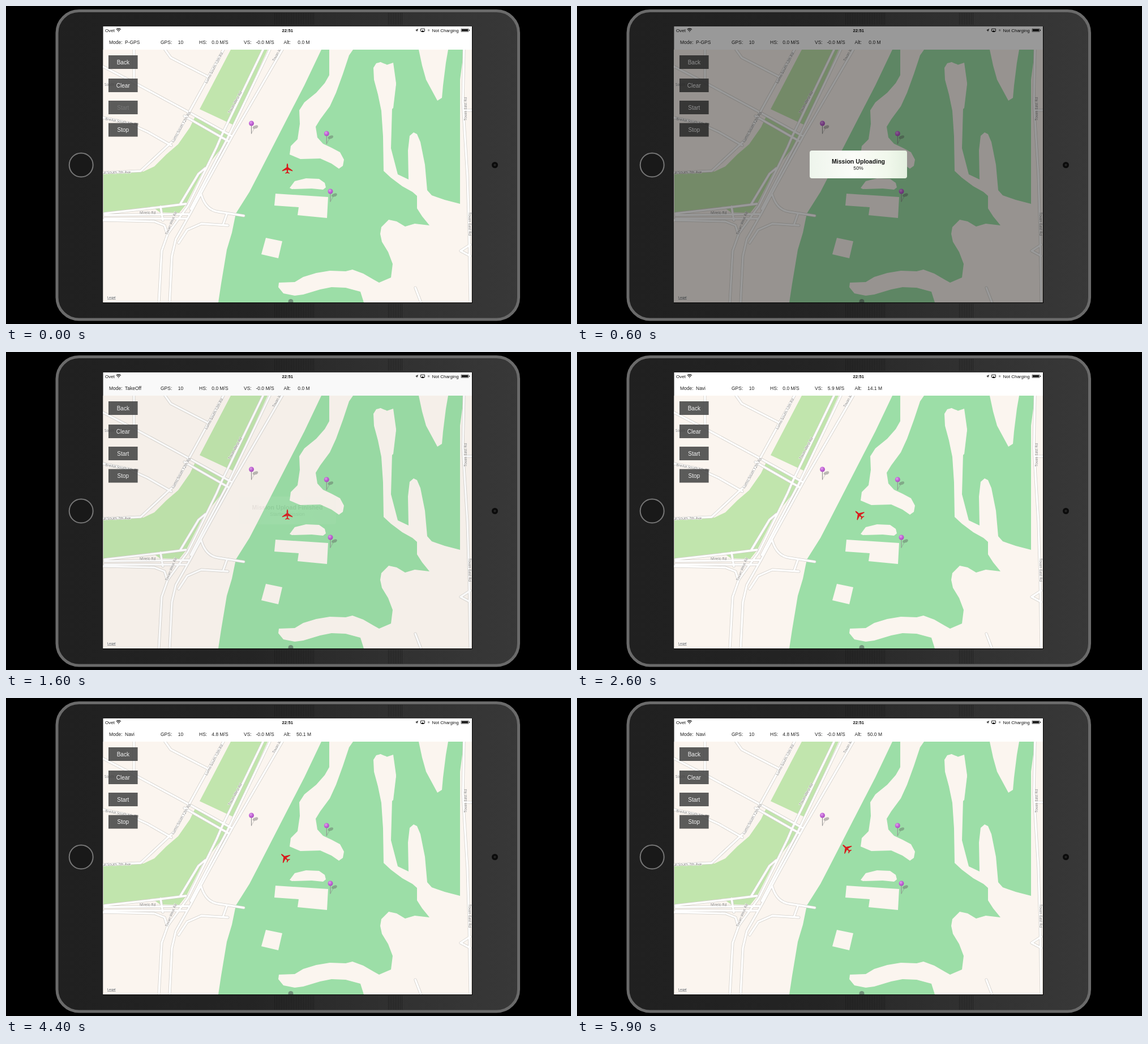
An HTML page that plays this animation: 998x561 px, repeating every 6000 ms.

```html
<!DOCTYPE html>
<html lang="en">
<head>
<meta charset="utf-8">
<title>Flight mission</title>
<style>
html, body { margin: 0; width: 100%; height: 100%; overflow: hidden; background: #000; }
svg { display: block; width: 100vw; height: 100vh; }
text { font-family: "Liberation Sans", Arial, sans-serif; }
.case, .road { fill: none; stroke-linejoin: round; stroke-linecap: round; }
.case { stroke: #d3d0cb; stroke-width: 5; }
.road { stroke: #fff; stroke-width: 3.4; }
.label { font: 6.4px "Open Sans", sans-serif; fill: #77736f; stroke: #fff; stroke-width: 1; paint-order: stroke; }
.bar { font-size: 8.5px; fill: #222; }
.status { font-size: 8px; fill: #111; }
.button { font-size: 10px; fill: #f2f2f2; }
.mid { text-anchor: middle; }
</style>
</head>
<body>
<svg viewBox="0 0 998 561" preserveAspectRatio="none">
  <defs>
    <linearGradient id="bezel">
      <stop offset="0" stop-color="#202020"/><stop offset=".42" stop-color="#242424"/>
      <stop offset=".56" stop-color="#2b2b2b"/><stop offset=".74" stop-color="#313131"/>
      <stop offset="1" stop-color="#383838"/>
    </linearGradient>
    <linearGradient id="panel">
      <stop offset="0" stop-color="#eef5ec"/><stop offset=".45" stop-color="#fbfcf8"/>
      <stop offset=".8" stop-color="#f1f8ec"/><stop offset="1" stop-color="#e3efdf"/>
    </linearGradient>
    <radialGradient id="ball" cx=".38" cy=".35" r=".65">
      <stop offset="0" stop-color="#e3a5ee"/><stop offset=".5" stop-color="#c568d9"/><stop offset="1" stop-color="#a94fbd"/>
    </radialGradient>
    <pattern id="stripes" width="3" height="3" patternUnits="userSpaceOnUse">
      <path d="M.5 0V3" stroke="#131313" stroke-width="1"/>
    </pattern>
    <clipPath id="mapClip"><path d="M171.5 77H823V523H171.5Z"/></clipPath>
    <g id="pin">
      <ellipse cx="7" cy="6.5" rx="5" ry="2.7" fill="#555" opacity=".38" transform="rotate(-22 7 6.5)"/>
      <path d="M0 18L5 9" stroke="#666" stroke-width="1.2" opacity=".25"/>
      <path d="M0 3V18.5" stroke="#909090" stroke-width="1.1"/>
      <circle r="4.5" fill="url(#ball)"/>
    </g>
  </defs>

  <rect x="90" y="8.5" width="815.5" height="544.5" rx="39" fill="url(#bezel)" stroke="#6a6a6a" stroke-width="5"/>
  <path d="M474 12H546V33H474ZM474 525H546V550H474ZM674 12H700V33H674ZM674 525H700V550H674Z" fill="url(#stripes)" opacity=".5"/>
  <circle cx="132.7" cy="280.5" r="21" fill="#191919" stroke="#777" stroke-width="2"/>
  <circle cx="863.5" cy="280.5" r="5.5" fill="#0b0b0b"/>
  <circle cx="863.5" cy="280.5" r="2" fill="#252525"/>
  <path d="M171 36H824V524H171Z" fill="#000"/>
  <path d="M171.5 36H823V523H171.5Z" fill="#fff"/>

  <g clip-path="url(#mapClip)">
    <path d="M171 77H823V523H171Z" fill="#fbf5ef"/>
    <path fill="#c1e5ad" d="M397 77H462L402 210 342 182ZM335 193L394 228 386 244 348 291 318 350 306 365 272 364 262 357 172 365V296L243 292 262 283 283 262 304 244 325 214Z"/>
    <path fill="#9cdea7" d="M557 77L527 140 497 198 443 303 430 328 406 366 399 400 390 430 380 490 375 523H632L626 504 600 497 575 496 555 500 525 509 510 511 490 507 481 496 482 488 510 487 525 478 548 471 572 467 600 468 612 465 631 472 650 483 659 488 680 479 683 455 675 434 664 416 661 402 663 390 676 377 690 380 705 389 722 384 748 387 735 371 726 357 726 335 718 328 700 318 680 303 667 291 666 230 663 185 657 156 650 130 649 109 654 101 662 99 672 104 684 100 689 136 682 180 680 251 692 297 711 306 710 255 713 229 720 223 726 226 732 240 740 280 744 325 752 334 775 342 802 349V130L809 77Z"/>
    <path fill="#fbf5ef" d="M660 99L672 103 685 124 689 138 684 180 672 190Z"/>
    <path fill="#fbf5ef" d="M571 77L571 122 563 136 548 153 527 170 518 184 519 208 515 235 503 247 501 262 520 270 555 269 575 278 588 287 595 282 597 271 590 258 575 250 560 243 550 232 547 213 555 200 572 177 583 153 595 120 606 87 613 77ZM729 77L735 105 742 130 762 167 770 162 772 140 777 100 781 77ZM501 321L510 309 530 304 553 305 563 312 565 320 560 324 540 322 505 323ZM476 331L569 337 567 374 515 369 517 355 474 352ZM459 409L488 415 481 445 451 438Z"/>
    <g id="roads"></g>
    <g id="labels"></g>
    <use href="#pin" x="433.5" y="207"/>
    <use href="#pin" x="566.3" y="225"/>
    <use href="#pin" x="573" y="327"/>
    <circle cx="503" cy="521.5" r="4.5" fill="#71917a"/>
    <path id="plane" fill="#d91a1c" d="M0 -9.5Q1.3 -8.5 1.3 -5.5V-2.4L9.2 3V4.4L1.3 2.1 .9 5.6 3.8 7.7V8.8L0 7.8 -3.8 8.8V7.7L-.9 5.6 -1.3 2.1 -9.2 4.4V3L-1.3 -2.4V-5.5Q-1.3 -8.5 0 -9.5Z"/>
    <text x="179" y="516" font-size="6" fill="#555" stroke="#fff" stroke-width=".8" paint-order="stroke" text-decoration="underline">Legal</text>
  </g>

  <g class="status">
    <text x="175" y="45.5">Ovet</text>
    <text x="497.3" y="45.5" class="mid" font-weight="bold" font-size="7.7">22:51</text>
    <text x="752.5" y="45.5">Not Charging</text>
    <g fill="none" stroke="#111" stroke-width="1.2">
      <path d="M194.7 41.4Q198.8 37.9 202.9 41.4M196.4 43.2Q198.8 41.2 201.2 43.2"/>
      <path d="M732.5 40.3H739.5V44.5H732.5Z" stroke-width=".9"/>
      <path d="M804 40.2H817V45.3H804Z" stroke-width=".6"/>
    </g>
    <path d="M197.5 44.5H200.1L198.8 46ZM723 43L728 40 725.8 45.8 725.4 43.3ZM733.3 46L736 42.6 738.7 46ZM804.8 41H816V44.5H804.8ZM817.6 41.7H819V43.8H817.6Z"/>
    <path d="M745 41.2H748.2V44.4H745Z" fill="#aaa"/>
  </g>
  <g class="bar">
    <text x="182" y="66.5">Mode:</text><text id="mode" x="210" y="66.5"></text>
    <text x="273" y="66.5">GPS:</text><text x="308.5" y="66.5" class="mid">10</text>
    <text x="341" y="66.5">HS:</text><text id="hs" x="378" y="66.5" class="mid"></text>
    <text x="420" y="66.5">VS:</text><text id="vs" x="457.5" y="66.5" class="mid"></text>
    <text x="490.5" y="66.5">Alt:</text><text id="alt" x="526" y="66.5" class="mid"></text>
  </g>
  <g id="buttons"></g>

  <path id="dim" d="M171.5 36H823V523H171.5Z"/>
  <g id="dialog" class="mid">
    <rect x="411" y="255" width="172" height="49" rx="4" fill="url(#panel)"/>
    <text id="title" x="497" y="277.8" font-size="10.6" font-weight="bold" fill="#111"></text>
    <text id="note" x="497" y="289.3" font-size="8.7" fill="#222"></text>
  </g>
</svg>
<script>
const $ = id => document.getElementById(id);

const roads = [
  "M384 77L322 190 297 236 284 248 238 291 172 294",
  "M226 77V135L322 187 398 229M172 107L226 135M315 194L392 238",
  "M281 77L291 91 357 125M172 197L215 206 250 222 292 246",
  "M454 77L381 228 372 249 321 353 286 401 275 432 270 523",
  "M466 77L390 236 352 308 326 358",
  "M488 77L400 229 350 320 326 365 300 411 293 441 289 523",
  "M352 286L340 296 308 349",
  "M174 366L270 355 318 349M174 369L322 367M174 375L320 375",
  "M172 378L262 380 280 387 284 400",
  "M273 354L277 378M345 333Q353 360 375 363L420 370M390 367L384 384",
  "M392 387L345 384 320 395 305 418",
  "M809 77L807 170 815 300 818 400 820 523M808 184H823M820 421L803 432 820 441",
  "M723 497L733 523"
];
$("roads").innerHTML = ["case", "road"].map(c => `<path class="${c}" d="${roads.join("")}"/>`).join("");

const labels = [
  ["Lumo South 12th Rd", 355, 137, -62], ["Lumo South 12th Rd", 296, 241, -60],
  ["Tovan West Rd", 396, 190, -61], ["Tovan West Rd", 474, 98, -61], ["Tovan West Rd", 285, 404, -67],
  ["South 6th Rd", 174, 141, 0], ["Bredal South 6th Rd", 175, 201, 10],
  ["al South 7th Ave", 172, 296, -1], ["Mirelo Rd", 236, 367, 0],
  ["Tovan East Rd", 814, 202, -90], ["Tovan East Rd", 817, 364, 90]
];
$("labels").innerHTML = labels.map(([s, x, y, a]) =>
  `<text class="label" transform="translate(${x} ${y}) rotate(${a})">${s}</text>`).join("");

$("buttons").innerHTML = [["Back", 87], ["Clear", 128], ["Start", 167], ["Stop", 206.5]].map(([s, y]) =>
  `<rect x="181" y="${y}" width="51.6" height="24" fill="#444" fill-opacity=".87"/>
   <text id="b${s}" class="button mid" x="206.8" y="${y + 15.6}">${s}</text>`).join("");

// Linear interpolation through [time, value] keys
function track(t, ...keys) {
  if (t <= keys[0][0]) return keys[0][1];
  for (let i = 1; i < keys.length; i++) {
    const [a, u] = keys[i - 1], [b, v] = keys[i];
    if (t <= b) return u + (v - u) * (t - a) / (b - a);
  }
  return keys.at(-1)[1];
}

function draw(t) {
  const done = t >= 700;
  const fade = track(t, [200, 0], [300, 1], [1500, 1], [1600, .06], [1700, 0]);
  $("dim").setAttribute("opacity", .4 * fade);
  $("dialog").setAttribute("opacity", fade);
  $("title").textContent = done ? "Mission Upload Finished" : "Mission Uploading";
  $("note").textContent = done ? "Starting mission" : t < 500 ? "0%" : "50%";
  $("bStart").style.fill = t < 300 ? "#777" : "";

  const hs = track(t, [3800, 0], [4100, 4.8]);
  const vs = track(t, [2000, -.04], [2300, 5.4], [2600, 5.9], [3500, 5.9], [3700, 4.1], [3900, 0], [5000, -.1], [5900, -.04]);
  const alt = track(t, [2000, 0], [2150, .5], [2600, 14.1], [3700, 48.4], [3800, 50.1], [5500, 50.1], [5900, 50]);
  $("mode").textContent = t < 1500 ? "P-GPS" : t < 2100 ? "TakeOff" : "Navi";
  $("hs").textContent = hs.toFixed(1) + " M/S";
  $("vs").textContent = vs.toFixed(1) + " M/S";
  $("alt").textContent = alt.toFixed(1) + " M";

  // The craft turns while climbing, then cruises at a steady speed
  const turn = track(t, [2000, 0], [2300, 1]);
  const go = track(t, [3800, 0], [4000, 1.2], [5900, 22.3]);
  $("plane").setAttribute("transform", `translate(${497 + 1.5 * turn - go} ${287 - .97 * go}) rotate(${-47 * turn})`);
}

function tick() {
  draw(Math.floor(performance.now() % 6000 / 100) * 100);
  requestAnimationFrame(tick);
}
tick();
</script>
</body>
</html>
```
